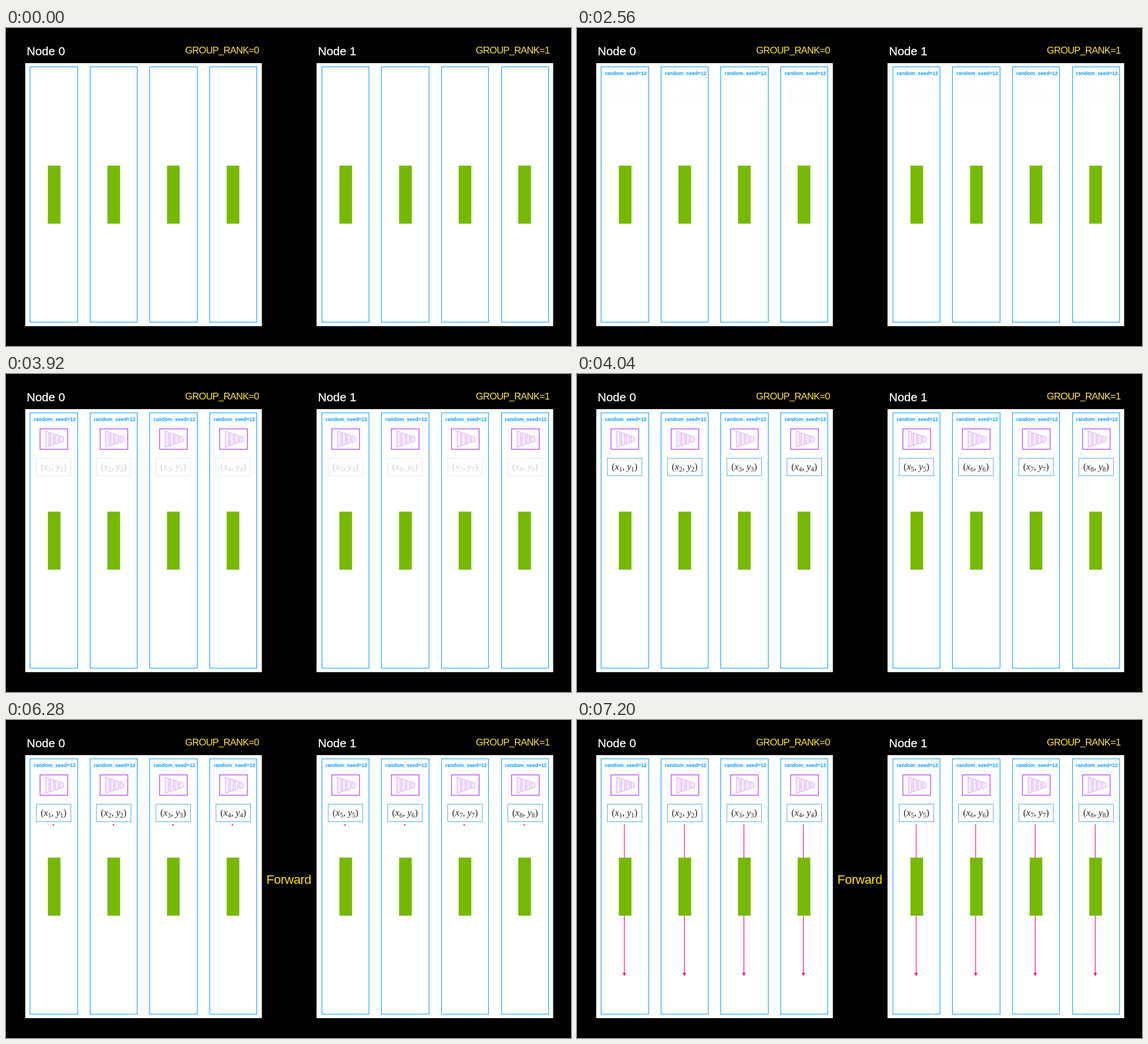
An HTML page for the animation above (8 s loop, 997x561 px).

```html
<!DOCTYPE html>
<html lang="en">
<head>
<meta charset="utf-8">
<title>Distributed forward pass</title>
<style>
  html, body { margin: 0; width: 100%; height: 100%; overflow: hidden; background: #000; }
  svg { display: block; width: 100vw; height: 100vh; }
  text { font-family: "Liberation Sans", Arial, sans-serif; white-space: pre; }
  .node { font-size: 21px; fill: #fff; stroke: #fff; stroke-width: .3px; }
  .rank { font-size: 17px; letter-spacing: -.68px; fill: #ffe843; }
  .forward { font-size: 22.4px; letter-spacing: -.45px; fill: #ffe00f; }
  .seed { font-size: 8.95px; font-weight: bold; fill: #0a9bff; }
  .math { font: 16.5px "Liberation Serif", "Times New Roman", serif; text-anchor: middle; fill: #222; }
  .variable { font-style: italic; }
  .index { font-size: 11.5px; }
</style>
</head>
<body>
<svg id="stage" viewBox="0 0 997 561">
  <defs>
    <pattern id="hatch" width="3" height="3" patternUnits="userSpaceOnUse">
      <path d="M0 3L3 0" stroke="#d9a3fa" stroke-width=".6"/>
    </pattern>
  </defs>
</svg>
<script>
const LOOP = 8000, STEP = 40, FADE = 155;
const DEVICES = 4, NODE_GAP = 514.6, COLUMN_GAP = 105.6, DEVICE_GAP = 105.2;
const ARROW = { start: 6210, duration: 990, top: 184, length: 268, head: 6 };
const stage = document.getElementById('stage');

function add(parent, tag, attributes, content = '') {
  const element = document.createElementNS('http://www.w3.org/2000/svg', tag);
  for (const [key, value] of Object.entries(attributes)) element.setAttribute(key, value);
  element.textContent = content;
  return parent.appendChild(element);
}
const group = () => add(stage, 'g', {});
const label = (parent, x, y, style, content) => add(parent, 'text', { x, y, class: style }, content);
const box = (parent, x, y, width, height, stroke, weight = 1) =>
  add(parent, 'rect', { x, y, width, height, fill: 'none', stroke, 'stroke-width': weight });
const fill = (parent, x, y, width, height, color) =>
  add(parent, 'rect', { x, y, width, height, fill: color });
// Centre a thin line on a pixel.
const snap = value => Math.floor(value) + .5;
const clamp = value => Math.min(1, Math.max(0, value));

const [base, seeds, models, samples, arrowLayer, devices, forward] = Array.from({ length: 7 }, group);
const arrows = [];

function drawModel(x) {
  box(models, x, 96.8, 48.7, 36, '#b95cf4', 1.5);
  for (let layer = 0; layer < 4; layer++) {
    const left = x + 10 + 8.4 * layer, right = left + 6;
    const tall = 14.5 - 2.8 * layer, short = tall - 2.5, middle = 115;
    add(models, 'path', {
      d: `M${left} ${middle - tall}L${right} ${middle - short}V${middle + short}L${left} ${middle + tall}Z`,
      fill: 'url(#hatch)', stroke: '#cf8cf8', 'stroke-width': .8
    });
  }
}

function drawSample(x, number) {
  box(samples, x, 148.5, 61, 31, '#5aade0');
  const math = label(samples, x + 30.5, 169.3, 'math', '(');
  const part = (content, style, dy) => add(math, 'tspan', { class: style, dy }, content);
  for (const [variable, after] of [['x', ', '], ['y', ')']]) {
    part(variable, 'variable', 0);
    part(number, 'index', 2.5);
    part(after, '', -2.5);
  }
}

function drawDevice(node, slot) {
  const edge = 42.6 + node * NODE_GAP + slot * COLUMN_GAP;
  const left = snap(edge);
  box(base, left, 68.5, snap(edge + 83.4) - left, 450.5, '#0d9dff', 1.1);
  label(seeds, edge + 6.8, 83.2, 'seed', 'random_seed=12');
  drawModel(left + 17.6);
  drawSample(left + 11, node * DEVICES + slot + 1);

  const deviceOffset = node * NODE_GAP + slot * DEVICE_GAP;
  fill(devices, 73.8 + deviceOffset, 242.8, 22.3, 102.4, '#76b900');
  arrows.push({
    x: snap(83.9 + deviceOffset),
    line: add(arrowLayer, 'path', { stroke: '#ff0d86', 'stroke-width': 1.2 }),
    head: add(arrowLayer, 'path', { fill: '#ff0d86' })
  });
}

for (const node of [0, 1]) {
  fill(base, 34 + node * 514, 62, 417.5, 464, '#fff');
  label(base, 36.5 + node * 514, 48, 'node', `Node ${node}`);
  label(base, 316 + node * 513, 45, 'rank', `GROUP_RANK=${node}`);
  for (let slot = 0; slot < DEVICES; slot++) drawDevice(node, slot);
}
label(forward, 459.5, 289, 'forward', 'Forward');

const fadeStarts = new Map([[seeds, 1200], [models, 2556], [samples, 3888], [forward, 5234]]);

function render(time) {
  const t = Math.floor(time % LOOP / STEP) * STEP;
  for (const [layer, start] of fadeStarts) layer.setAttribute('opacity', clamp((t - start) / FADE));

  const progress = clamp((t - ARROW.start) / ARROW.duration);
  const length = ARROW.length * (1 - Math.cos(Math.PI * progress)) / 2;
  const tip = ARROW.top + length;
  const size = Math.min(ARROW.head, length);
  arrowLayer.setAttribute('visibility', progress > 0 ? 'visible' : 'hidden');
  for (const { x, line, head } of arrows) {
    line.setAttribute('d', `M${x} ${ARROW.top}V${tip - size}`);
    head.setAttribute('d', `M${x - size / 2} ${tip - size}h${size}L${x} ${tip}Z`);
  }
}

const began = performance.now();
function tick() {
  render(performance.now() - began);
  requestAnimationFrame(tick);
}
tick();
</script>
</body>
</html>
```
